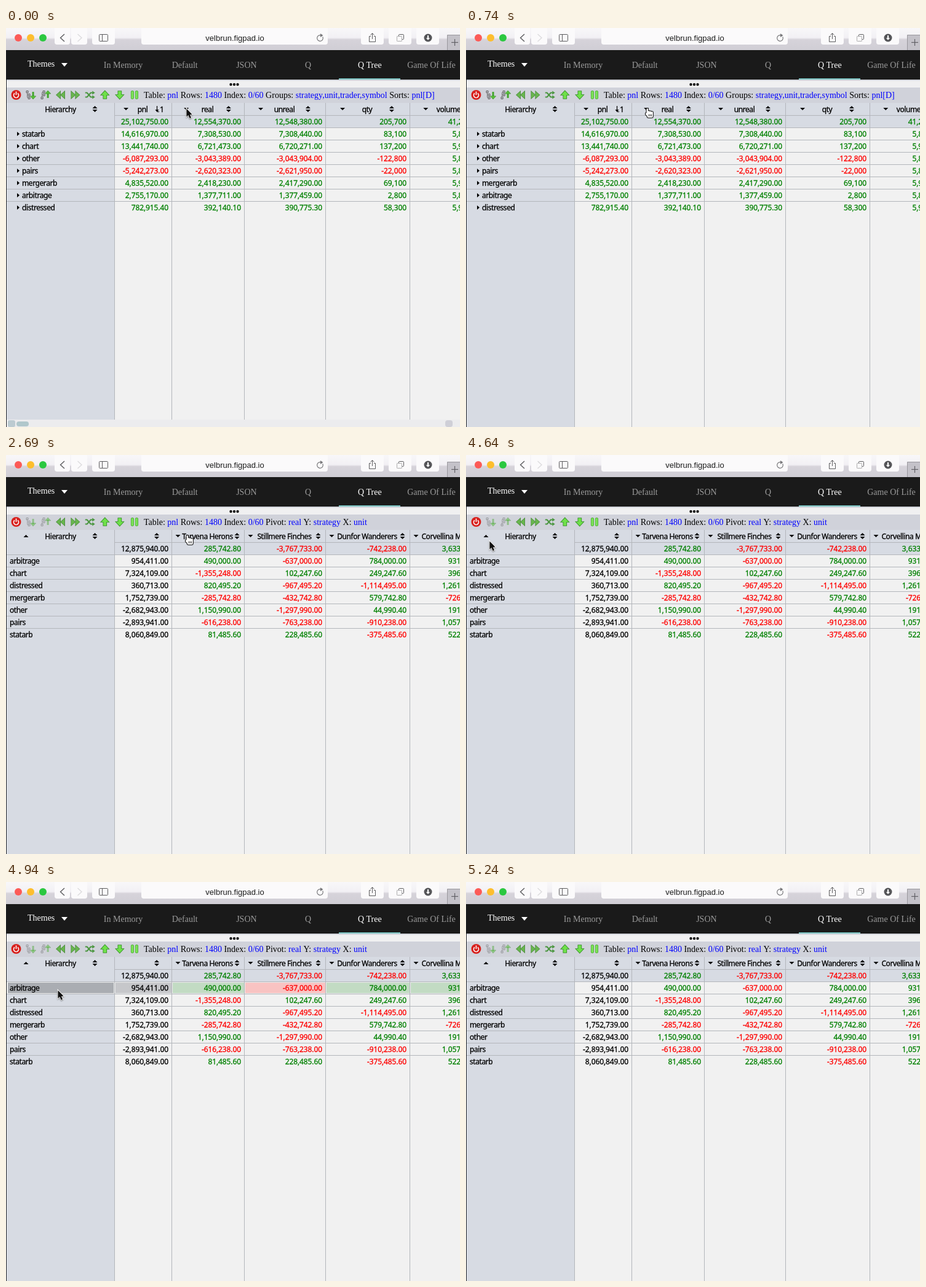
An HTML page with a canvas that plays this animation: 738 px wide and 650 px high, repeating every 8 s.

```html
<!DOCTYPE html>
<html lang="en">
<head>
<meta charset="utf-8">
<title>Pivot grid</title>
<style>
html, body { margin: 0; width: 100%; height: 100%; overflow: hidden; background: #f1f1f1; }
canvas { display: block; }
</style>
</head>
<body>
<canvas id="stage" width="738" height="650"></canvas>
<script>
const c = document.getElementById('stage').getContext('2d');
const W = 738, H = 650, LOOP = 8000, ROW = 20, TOP = 122;
const SANS = '12px "Noto Sans", "Open Sans", sans-serif';
const SERIF = '14px "Liberation Serif", serif';
const GREEN = '#008000', RED = '#ff0000', BLUE = '#0000ff';
const PANEL = '#d7dbe3', LINE = '#b3b6bb';
const COLS = [176, 269, 387, 519, 656, 784];

// name, realised profit, quantity, signs of the pivoted cells
const STRATEGIES = [
  ['statarb', 7308530, 83100, '++-+'],
  ['chart', 6721473, 137200, '-+++'],
  ['other', -3043389, -122800, '+-++'],
  ['pairs', -2620323, -22000, '---+'],
  ['mergerarb', 2418230, 69100, '--+-'],
  ['arbitrage', 1377711, 2800, '+-++'],
  ['distressed', 392140.1, 58300, '+--+']
];

// evenly scattered values in 0..1
const scatter = (k, phase) => (k * 0.618034 + phase) % 1;

function makeTable(list, cells, decimals) {
  const rows = list.map(cells);
  rows.unshift(rows[0].map((_, i) => rows.reduce((sum, r) => sum + r[i], 0)));
  const show = (v, i) => Number(v.toPrecision(7)).toLocaleString('en-US',
    { minimumFractionDigits: decimals(i), maximumFractionDigits: decimals(i) });
  return { labels: list.map(s => s[0]), rows: rows.map(r => r.map(show)) };
}

const TREE = makeTable(STRATEGIES, ([, real, qty], k) => {
  const unreal = real - 1800 * scatter(k, 0.05);
  return [real + unreal, real, unreal, qty, 5.82e6 + 1.5e5 * scatter(k, 0.2)];
}, i => i < 3 ? 2 : 0);

const PIVOT = makeTable([...STRATEGIES].sort((a, b) => a[0] < b[0] ? -1 : 1), ([, real, , signs], k) => {
  const cells = [...signs].map((s, i) => (s === '-' ? -1.4e6 : 1.4e6) * scatter(k, 0.35 + 0.105 * i));
  return [real + 1.66e6 * (scatter(k, 0.245) - 0.5), ...cells];
}, () => 2);

// start time, cursor kind, position
const CURSOR = [
  [0, arrow, 293, 131], [140, arrow, 292, 131], [740, hand, 291, 130],
  [4190, null], [4490, hand, 27, 140], [4640, arrow, 38, 140],
  [4790, arrow, 80, 174], [4940, arrow, 84, 176], [5090, arrow, 125, 229],
  [5240, null]
];

function rect(x, y, w, h, fill) {
  c.fillStyle = fill;
  c.fillRect(x, y, w, h);
}
function paint(fill, stroke, width = 1) {
  if (stroke) { c.strokeStyle = stroke; c.lineWidth = width; c.stroke(); }
  if (fill) { c.fillStyle = fill; c.fill(); }
}
function round(x, y, w, h, r, fill, stroke) {
  c.beginPath();
  c.roundRect(x, y, w, h, r);
  paint(fill, stroke);
}
function arc(x, y, r, from, to, fill, stroke, width) {
  c.beginPath();
  c.arc(x, y, r, from, to);
  paint(fill, stroke, width);
}
const disc = (x, y, r, fill) => arc(x, y, r, 0, 7, fill);
function trace(pts) {
  c.beginPath();
  for (let i = 0; i < pts.length; i += 2) c.lineTo(pts[i], pts[i + 1]);
}
function poly(pts, fill, stroke, width) {
  trace(pts);
  c.closePath();
  paint(fill, stroke, width);
}
function line(pts, color, width) {
  trace(pts);
  paint(null, color, width);
}
function at(x, y, draw, flip = 1) {
  c.save();
  c.translate(x, y);
  c.scale(1, flip);
  draw();
  c.restore();
}
function text(s, x, y, color, font, align = 'left') {
  c.font = font;
  c.letterSpacing = '0px';
  c.textAlign = align;
  c.fillStyle = color;
  c.fillText(s, x, y);
}
// grid text is slightly heavier than the regular face
function gridText(s, x, y, color, align, gap) {
  c.font = SANS;
  c.letterSpacing = gap + 'px';
  c.textAlign = align;
  c.fillStyle = c.strokeStyle = color;
  c.lineWidth = 0.3;
  c.fillText(s, x, y);
  c.strokeText(s, x, y);
}
const label = (s, x, y, align = 'left') => gridText(s, x, y, '#000', align, -0.42);
function caret(x, y, dir = 1, color = '#000', w = 4, h = 4) {
  poly([x - w, y - dir * h / 2, x + w, y - dir * h / 2, x, y + dir * h / 2], color);
}
function sorter(x) {
  caret(x, 129, -1);
  caret(x, 135, 1);
}

function drawChrome() {
  const g = c.createLinearGradient(0, 0, 0, 36);
  g.addColorStop(0, '#f8f7f9');
  g.addColorStop(0.44, '#f2f0f4');
  g.addColorStop(0.52, '#d6d3da');
  g.addColorStop(1, '#d0ced5');
  rect(0, 0, W, 36, g);
  const button = (x, w) => round(x, -6, w, 33, 4, '#fbfafb');
  button(79, 25);
  button(106, 26);
  button(140, 37);
  button(220, 303);
  for (let x = 577; x < 700; x += 45) button(x, 37);
  ['#fc5b57', '#fdbe2f', '#2bc840'].forEach((f, i) => disc(20 + i * 20, 16, 6, f));

  const ink = '#5c5c5e';
  line([95, 10, 88.5, 16, 95, 22], ink, 1.4);
  line([116.5, 10, 123, 16, 116.5, 22], '#dddcde', 1.4);
  round(151.5, 10.5, 14, 11, 1, null, ink);
  line([156.5, 10.5, 156.5, 21.5], ink);
  text('velbrun.figpad.io', 372, 21, '#1c1c1c', '13px "Liberation Sans", sans-serif', 'center');

  arc(510.5, 16.5, 4.8, -0.5, 5.1, null, '#77777a', 1.2);
  poly([511, 9, 515.5, 12, 511, 15], '#77777a');
  at(595.5, 0, () => {
    line([-2.5, 13.5, -5, 13.5, -5, 22.5, 5, 22.5, 5, 13.5, 2.5, 13.5], ink);
    line([0, 18, 0, 9], ink);
    line([-3, 11.5, 0, 8.5, 3, 11.5], ink);
  });
  round(638.5, 10.5, 8, 8, 1, null, ink);
  round(635.5, 13.5, 8, 8, 1, '#fbfafb', ink);
  disc(686, 16, 6.5, '#555558');
  rect(685, 12, 2, 5, '#fff');
  caret(686, 18, 1, '#fff', 3.2, 3.5);

  rect(717, 11, 21, 25, '#c4c2c9');
  line([717.5, 36, 717.5, 11.5, W, 11.5], '#99979d');
  line([724, 23.5, 735, 23.5], '#626166', 1.2);
  line([729.5, 18, 729.5, 29], '#626166', 1.2);
}

function drawNav() {
  rect(0, 36, W, 48, '#1a1a1a');
  text('Themes', 35, 63, '#fff', SERIF);
  caret(95, 60, 1, '#fff', 5, 6);
  ['In Memory', 'Default', 'JSON', 'Q', 'Q Tree', 'Game Of Life'].forEach((s, i) => {
    const x = 190.5 + i * 100.2, active = s === 'Q Tree';
    text(s, x, 65, active ? '#fff' : '#9b9b9b', SERIF, 'center');
    if (active) rect(Math.round(x) - 50, 82, 100, 2, '#7cc5c3');
  });
  rect(0, 84, W, 2, '#d4d6dd');
  rect(0, 86, W, 11, '#f0f0f1');
  for (let i = -1; i < 2; i++) disc(371 + i * 5.5, 92, 2.2, '#111');
}

function power() {
  disc(0, 0, 8, '#d8201c');
  arc(0, 0.5, 4, -0.9, 4.04, null, '#fff', 1.6);
  line([0, -5.5, 0, 0], '#fff', 1.6);
}
function list() {
  for (let i = -1; i < 2; i++) round(i < 0 ? -7.5 : -4.5, i * 5 - 1.5, 3, 3, 0, null, '#555');
  line([-6, -4, -6, 4, -4, 4], '#777');
  rect(2, -5, 3, 9, '#43a52c');
  poly([-1, 2, 8, 2, 3.5, 7], '#55bd37', '#2f7f22', 0.8);
}
function skip(dir) {
  for (const x of [-3.5, 3.5])
    poly([x + dir * 3, 0, x - dir * 3, -5.5, x - dir * 3, 5.5], '#69b64e', '#4b8b3c', 1.6);
}
function shuffleLine() {
  line([-8, -3.5, -5, -3.5, 1, 3.5, 4, 3.5], '#4b9640', 2);
  poly([3.5, 0.5, 8, 3.5, 3.5, 6.5], '#4b9640');
}
function bigArrow() {
  poly([0, -6.5, 6, 0, 2.5, 0, 2.5, 6, -2.5, 6, -2.5, 0, -6, 0], '#6fe04a', '#2c8a1f', 1.6);
}
function pause() {
  for (const x of [-5.5, 1.5]) round(x, -6.5, 4, 13, 1.5, '#7be056', '#2c8a1f');
}

function drawToolbar(pivot) {
  rect(0, 97, W, 25, '#d0d2da');
  const icon = (slot, draw, flip) => at(16.5 + slot * 24.05, 109, draw, flip);
  icon(0, power);
  c.globalAlpha = pivot ? 0.45 : 1;
  icon(1, list);
  icon(2, list, -1);
  c.globalAlpha = 1;
  icon(3, () => skip(-1));
  icon(4, () => skip(1));
  icon(5, shuffleLine);
  icon(5, shuffleLine, -1);
  icon(6, bigArrow);
  icon(7, bigArrow, -1);
  icon(8, pause);

  const info = 'Table: pnl Rows: 1480 Index: 0/60 ' +
    (pivot ? 'Pivot: real Y: strategy X: unit' : 'Groups: strategy,unit,trader,symbol Sorts: pnl[D]');
  let x = 224;
  for (const word of info.split(' ')) {
    text(word, x, 114, word.endsWith(':') ? '#000' : BLUE, SERIF);
    x += c.measureText(word + ' ').width;
  }
}

function drawHeader(pivot) {
  const names = pivot
    ? ['', 'Tarvena Herons', 'Stillmere Finches', 'Dunfor Wanderers', 'Corvellina Moths']
    : ['pnl', 'real', 'unreal', 'qty', 'volume'];
  label('Hierarchy', 88.5, 137, 'center');
  sorter(144.5);
  if (pivot) caret(32.5, 132, -1);
  names.forEach((name, i) => {
    const left = COLS[i], right = COLS[i + 1];
    const inset = pivot ? 10.5 : (right - left) * 0.205;
    label(name, (left + right) / 2 - 0.5, 137, 'center');
    if (name) caret(left + inset, 132);
    if (name !== 'pnl') sorter(right - (name ? inset + 1 : 24));
  });
  if (pivot) return;
  line([245.5, 127, 245.5, 135], '#000', 1.2);
  caret(245.5, 135, 1, '#000', 3, 4);
  line([246, 136.5, 249, 136.5], '#000');
  label('1', 250, 137);
}

const isNeg = s => s[0] === '-';

function highlight(row, values) {
  const y = TOP + 22 + row * ROW;
  rect(1, y - 1, W, 19, '#eceded');
  rect(3, y, 172, 17, '#aaadb2');
  values.forEach((s, i) => {
    const x = COLS[i] + 2;
    rect(x, y, COLS[i + 1] - x, 17, i === 0 ? '#c6c7ca' : isNeg(s) ? '#f8c3c2' : '#c2dbc3');
  });
}

function drawTable(pivot, hot) {
  const { labels, rows } = pivot ? PIVOT : TREE;
  rect(0, TOP, W, H - TOP, '#f1f1f1');
  rect(0, TOP, W, 2 * ROW, PANEL);
  rect(0, TOP, 176, H - TOP, PANEL);
  if (hot) highlight(hot, rows[hot]);
  rect(177, TOP + ROW, W, 1, LINE);
  for (let i = 0; i < labels.length; i++) rect(1, TOP + (i + 2) * ROW, W, 1, LINE);
  for (const x of COLS) rect(x, TOP, 1, H - TOP, LINE);
  drawHeader(pivot);

  rows.forEach((values, r) => {
    const y = 157 + r * ROW;
    values.forEach((s, i) => {
      const color = pivot && i === 0 ? '#000' : isNeg(s) ? RED : GREEN;
      gridText(s, COLS[i + 1] - 5, y, color, 'right', -0.1);
    });
    if (!r) return;
    label(labels[r - 1], pivot ? 6 : 26, y);
    if (!pivot) poly([18, y - 8, 22, y - 4.5, 18, y - 1], '#000');
  });
}

function drawScrollbars(alpha) {
  c.globalAlpha = alpha;
  rect(1, 638, W, 12, '#ececee');
  round(3, 639, 12, 11, 3, '#bccbd1');
  round(17, 641, 20, 8, 4, '#b0c7cb');
  round(714, 639, 12, 11, 4, '#cfcfd7');
  c.globalAlpha = 1;
}

function arrow() {
  c.shadowColor = 'rgba(0,0,0,.35)';
  c.shadowBlur = 2;
  c.shadowOffsetY = 1;
  poly([0.5, 0.5, 0.5, 13.5, 3.4, 10.8, 5.7, 16, 8, 15, 5.7, 10, 9.5, 9.7], '#111', '#fff', 2);
}

function hand() {
  c.beginPath();
  c.roundRect(2.5, 1, 2.6, 12, 1.3);
  for (let i = 0; i < 3; i++) c.roundRect(5.1 + i * 2.6, 5 + i * 0.6, 2.6, 8, 1.3);
  c.roundRect(1, 8, 4, 4, 1.5);
  c.roundRect(3.5, 9, 9.4, 7, 2.5);
  paint('#fff', '#111', 2);
  for (let i = 0; i < 3; i++) line([6.2 + i * 2.2, 10.5, 6.2 + i * 2.2, 14], '#222', 0.9);
}

function render(t) {
  const pivot = t >= 2690;
  const hot = t >= 5240 ? 0 : t >= 5090 ? 3 : t >= 4790 ? 1 : 0;
  drawChrome();
  drawNav();
  drawToolbar(pivot);
  drawTable(pivot, hot);
  drawScrollbars(t < 290 ? 1 : t < 440 ? 0.5 : 0);
  rect(0, 36, 1, H - 36, '#24262b');
  const [, draw, x, y] = CURSOR.filter(k => k[0] <= t).pop();
  if (draw) at(x, y, draw);
}

const start = performance.now();
function tick() {
  render((performance.now() - start) % LOOP);
  requestAnimationFrame(tick);
}
tick();
</script>
</body>
</html>
```
